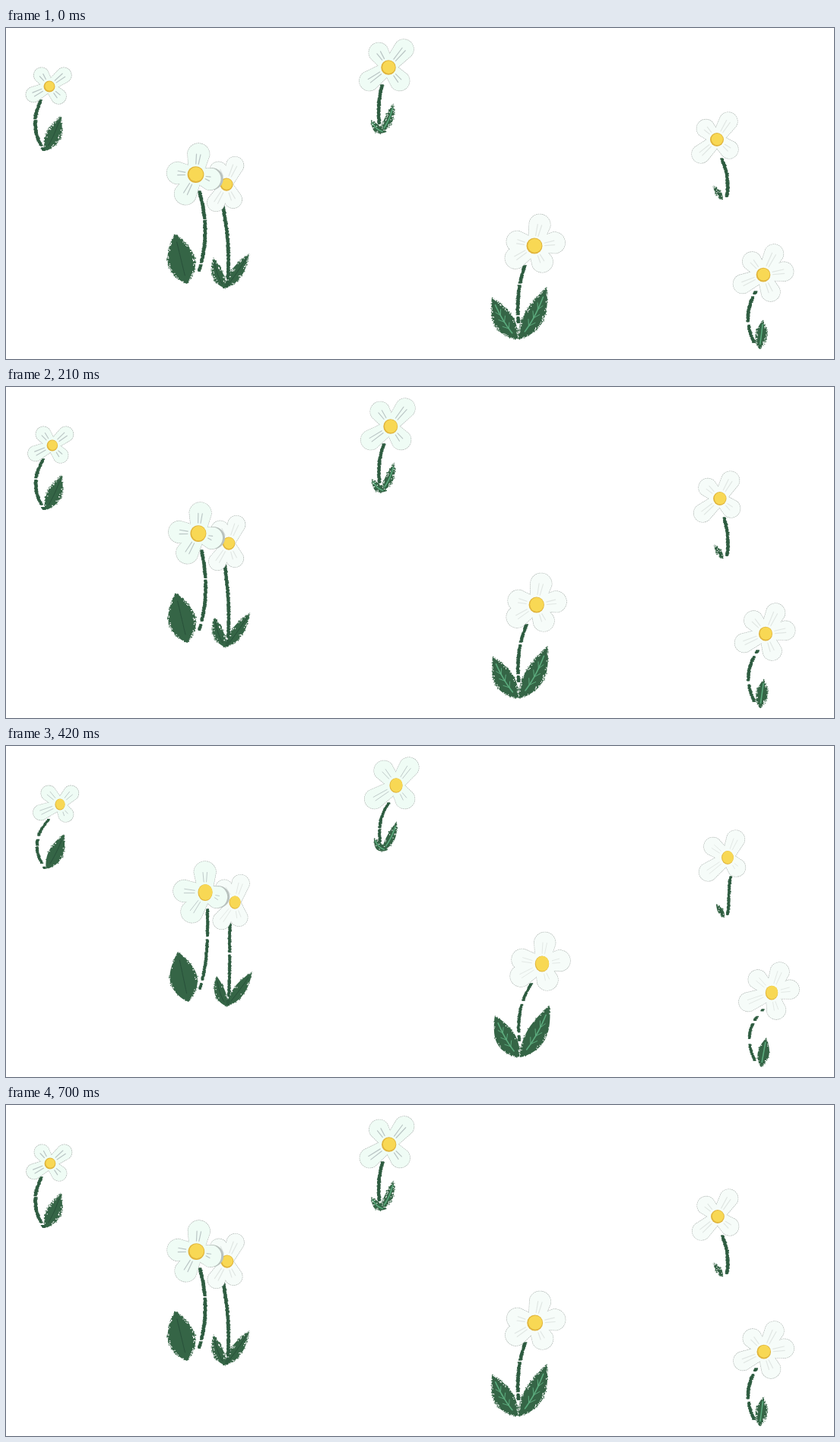
Animation of 1089 by 436 pixels, one loop 770 ms. Source, as an HTML page with a canvas:

```html
<!DOCTYPE html>
<html lang="en">
<head>
<meta charset="utf-8">
<title>Swaying daisies</title>
<style>
html, body { margin: 0; width: 100%; height: 100%; overflow: hidden; background: #fff; }
canvas { display: block; width: 1089px; height: 436px; }
</style>
</head>
<body>
<canvas id="stage" width="1089" height="436"></canvas>
<script>
const ctx = document.getElementById('stage').getContext('2d');
const STEP = 70, STEPS = 11, PEAK = 6;
const LEAF = '#356546', STEM = '#2e5c40', DARK = '#28503a', LIGHT = '#5cac7e';
const MINT = '#effcf5', PALE = '#f6fcf9';
const RAD = Math.PI / 180;

const leaf = (tip, base, half, bend = 0) => ({ tip, base, half, bend });

// angles are petal directions in degrees; reach and size shape every petal.
const flowers = [
  {
    head: [57, 77], angles: [-125, -38, 47, 153], reach: 21, size: 10, lean: 14, mint: true, gap: .3,
    top: [46, 95], base: [50, 161], bend: -9.5,
    leaves: [leaf([72, 116], [51, 162], 9.5, 2)]
  },
  {
    head: [503, 52], angles: [-123, -50, 145, 50], reach: 27, size: 13, lean: 10, mint: true, veined: true,
    top: [495, 75], base: [491, 126], bend: -2.5,
    leaves: [leaf([510, 99], [492, 138], 5.5, 3), leaf([480, 121], [500, 137], 5, -4)]
  },
  {
    head: [290, 206], angles: [-66, 66, 120, 240], reach: 24, size: 11.5, lean: 11,
    top: [285, 234], base: [291, 340], bend: 4,
    leaves: [leaf([273, 303], [289, 343], 7, -3), leaf([320, 297], [288, 343], 7.5, 1)]
  },
  {
    head: [249.5, 193], angles: [-82, 185, 118, 15], reach: 25, size: 14.5, lean: 12.5, mint: true, shade: true,
    top: [254, 215], base: [254, 320], bend: 8,
    leaves: [leaf([222, 271], [238, 337], 18)]
  },
  {
    head: [695, 287], angles: [-76, 194, 147, 64, -9], reach: 26, size: 14, lean: 10, veined: true, gap: .2,
    top: [682, 313], base: [674, 388], bend: -4,
    leaves: [leaf([639, 355], [673, 410], 13, -3), leaf([711, 342], [674, 410], 13, 4)]
  },
  {
    head: [935, 147], angles: [-135, -58, 138, 39], reach: 24.5, size: 12, lean: 14,
    top: [941, 172], base: [948, 222], bend: 4,
    leaves: [leaf([930, 208], [943, 226], 3.5)]
  },
  {
    head: [996, 325], angles: [-63, -130, 156, 67, -9], reach: 27, size: 12.5, lean: 11, veined: true, gap: .45,
    top: [986, 347], base: [984, 414], bend: -9,
    leaves: [leaf([996, 384], [991, 423], 7.5)]
  }
];

function seeded(seed) {
  let n = seed;
  return () => {
    n = (n * 16807) % 2147483647;
    return n / 2147483647;
  };
}

// Point at fraction t from a to b, pushed sideways (to the right of a downward line).
function along([ax, ay], [bx, by], t, side) {
  const dx = bx - ax, dy = by - ay, len = Math.hypot(dx, dy);
  return [ax + dx * t + dy / len * side, ay + dy * t - dx / len * side];
}

// Slow start, fast finish, then back along the same path.
function swayAt(ms) {
  const k = Math.floor(ms / STEP) % STEPS;
  const p = (k <= PEAK ? k : STEPS - k) / PEAK;
  return .4 * p + .6 * p ** 3;
}

function line(points, color, width) {
  ctx.strokeStyle = color;
  ctx.lineWidth = width;
  ctx.beginPath();
  points.forEach(p => ctx.lineTo(...p));
  ctx.stroke();
}

function drawStem({ top, base, bend, lean, gap = .1 }, s, rand) {
  const height = base[1] - top[1];
  const count = Math.round(height * 1.25);
  ctx.fillStyle = STEM;
  for (let i = 0; i <= count; i++) {
    const t = i / count;
    const [x, y] = along(top, base, t, bend * 4 * t * (1 - t));
    const shift = lean * .78 * s * (1 - t) ** 3 + s;
    const w = 4.4 * (.75 + rand() * .4) * (1 - .15 * s);
    const jitter = (rand() - .5) * 1.2;
    const clump = Math.sin(t * 23 + top[0]) * Math.sin(t * 11 + 1);
    if (clump < 1 - gap * (.5 + s)) ctx.fillRect(x + shift - w / 2 + jitter, y - .7, w, 1.6);
  }
}

function drawLeaf({ tip, base, half, bend }, veined, s, rand) {
  const from = [tip[0] + 4 * s, tip[1]], to = [base[0] + 2 * s, base[1]];
  // Profile is zero at both ends and fullest just below the middle.
  const edge = (t, side) => {
    const belly = Math.sin(Math.PI * t ** 1.15) ** .8;
    return along(from, to, t, belly * (side * half + bend));
  };
  const rows = Array.from({ length: 25 }, (_, i) => i / 24);
  ctx.fillStyle = LEAF;
  ctx.beginPath();
  rows.forEach(t => ctx.lineTo(...edge(t, -1)));
  rows.reverse().forEach(t => ctx.lineTo(...edge(t, 1)));
  ctx.fill();

  line(rows.filter(t => t > .15 && t < .85).map(t => edge(t, 0)), veined ? LIGHT : DARK, veined ? 1.6 : 1);
  if (veined && half > 10) {
    for (let t = .4; t < .8; t += .16) {
      for (const side of [-.4, .4]) line([edge(t, 0), edge(t - .1, side)], LIGHT, 1);
    }
  }

  // Chalky edge: flecks of paper inside, flecks of pigment outside.
  const flecks = (to[1] - from[1]) * 1.8;
  for (let i = 0; i < flecks; i++) {
    const t = rand(), side = rand() < .5 ? -1 : 1, paper = rand() < .6;
    const inset = paper ? rand() * 3 : -rand();
    const [x, y] = edge(t, side * (1 - inset / half));
    if (rand() < s * .6) continue;
    ctx.fillStyle = paper ? '#fff' : LEAF;
    ctx.fillRect(x - .6, y - .6, 1.2, 1.2);
  }
}

function petalPath([cx, cy], { x, y, r }) {
  const a = Math.atan2(y - cy, x - cx), q = Math.PI / 2;
  ctx.beginPath();
  ctx.arc(cx, cy, r * .62, a + q, a - q);
  ctx.arc(x, y, r, a - q, a + q);
  ctx.closePath();
}

function disc(x, y, rx, ry, color) {
  ctx.fillStyle = color;
  ctx.beginPath();
  ctx.ellipse(x, y, rx, ry, 0, 0, Math.PI * 2);
  ctx.fill();
}

function drawHead({ head, angles, reach, size, lean, mint, shade }, s) {
  const c = [head[0] + lean * s, head[1]];
  // Every head is stretched along the rising diagonal; tips lag behind the centre.
  const petals = angles.map(deg => {
    const d = reach * (1 + .16 * Math.cos(2 * (deg + 50) * RAD));
    return {
      x: head[0] + d * Math.cos(deg * RAD) + lean * .68 * s,
      y: head[1] + d * Math.sin(deg * RAD),
      r: size
    };
  });

  if (shade) {
    const p = petals[petals.length - 1];
    disc(p.x, p.y, p.r, p.r, '#b9c2bf');
    p.x -= 3;
  }

  ctx.strokeStyle = '#b3bbb7';
  ctx.lineWidth = 1.3;
  ctx.setLineDash([1, 1.6]);
  for (const p of petals) {
    petalPath(c, p);
    ctx.stroke();
  }
  ctx.setLineDash([]);
  ctx.fillStyle = mint ? MINT : PALE;
  for (const p of petals) {
    petalPath(c, p);
    ctx.fill();
  }

  const r = size * .75;
  for (const p of petals) {
    const d = Math.hypot(p.x - c[0], p.y - c[1]);
    for (const off of [-1.7, 1.7]) {
      const ends = [(r + 3) / d, Math.max(1, (r + 8) / d)];
      line(ends.map((t, i) => along(c, [p.x, p.y], t, off * (1 + i * .6))), mint ? '#b9c4c4' : '#e0e6e3', 1.2 - .3 * s);
    }
  }

  const rx = r * (1 - .12 * s);
  const rim = 1.4 * (1 - .6 * s);
  disc(...c, rx, r, '#e0b43c');
  disc(c[0] + .4, c[1] - .4, rx - rim, r - rim, '#f8d854');
}

function draw(ms) {
  const s = swayAt(ms);
  ctx.fillStyle = '#fff';
  ctx.fillRect(0, 0, 1089, 436);
  ctx.lineCap = ctx.lineJoin = 'round';
  flowers.forEach((f, i) => {
    const rand = seeded(911 + i * 7919);
    f.leaves.forEach(l => drawLeaf(l, f.veined, s, rand));
    drawStem(f, s, rand);
    drawHead(f, s);
  });
}

let start;
function tick(now) {
  start ??= now;
  draw(now - start);
  requestAnimationFrame(tick);
}
draw(0);
requestAnimationFrame(tick);
</script>
</body>
</html>
```
